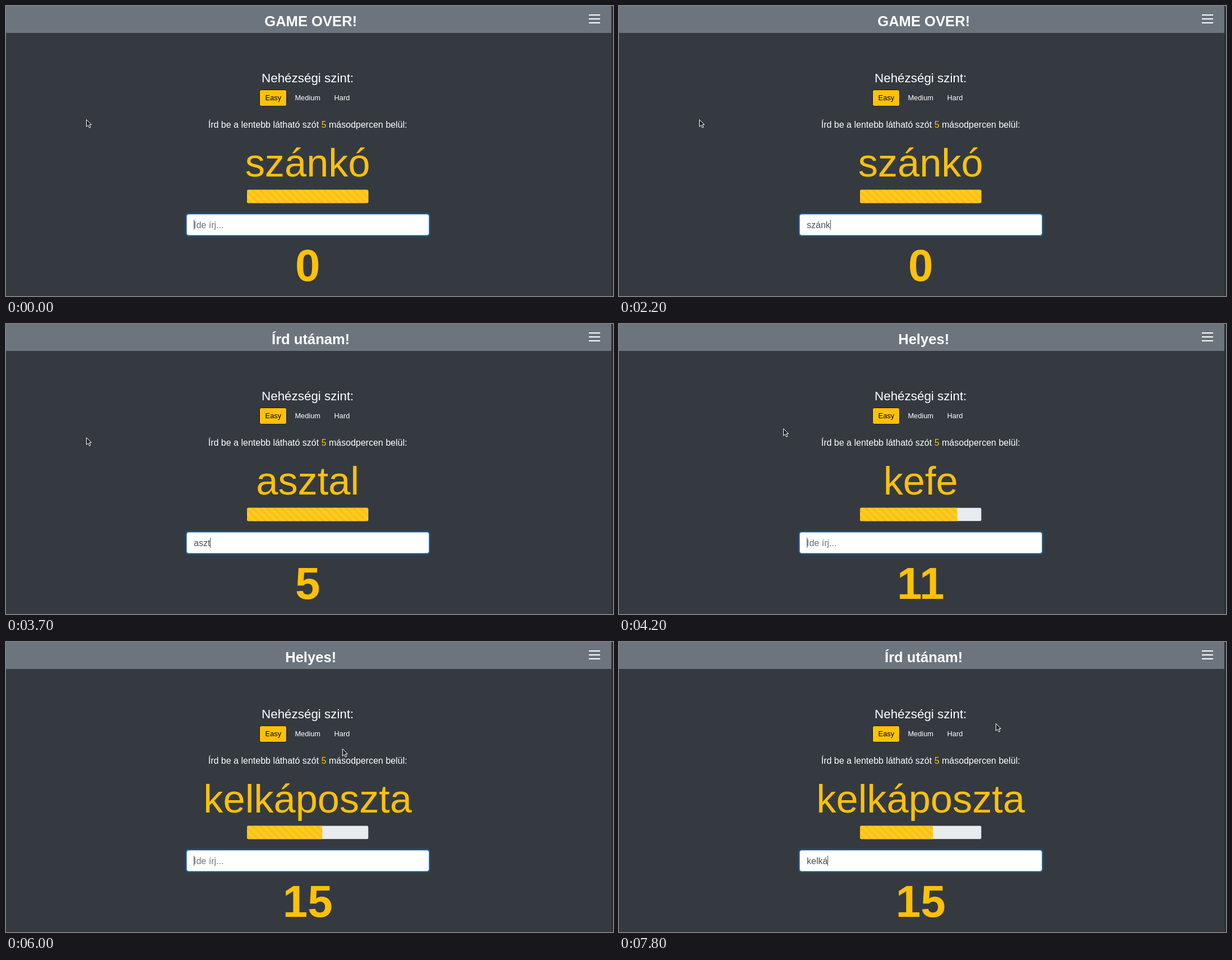
An HTML page that plays this animation: 1083 by 517 pixels, repeating every 8 s.

```html
<!DOCTYPE html>
<html lang="hu">
<head>
<meta charset="utf-8">
<title>Írd utánam!</title>
<style>
  html, body { margin: 0; width: 100%; height: 100%; overflow: hidden; background: #343a40; }
  svg { display: block; font-family: "Liberation Sans", Arial, sans-serif; fill: #fff; }
  .mid { text-anchor: middle; }
  .gold { fill: #ffc107; }
  .bold { font-weight: bold; }
  .fill { fill: #495057; }
  .hint { fill: #6c757d; }
</style>
</head>
<body>
<svg width="1083" height="517" viewBox="0 0 1083 517">
  <defs>
    <linearGradient id="shade" gradientUnits="userSpaceOnUse" x1="0" y1="12.8" x2="12.8" y2="0">
      <stop offset=".25" stop-color="#fff" stop-opacity=".15"/>
      <stop offset=".25" stop-color="#fff" stop-opacity="0"/>
      <stop offset=".5" stop-color="#fff" stop-opacity="0"/>
      <stop offset=".5" stop-color="#fff" stop-opacity=".15"/>
      <stop offset=".75" stop-color="#fff" stop-opacity=".15"/>
      <stop offset=".75" stop-color="#fff" stop-opacity="0"/>
    </linearGradient>
    <pattern id="stripes" patternUnits="userSpaceOnUse" x="430" y="327.5" width="12.8" height="12.8">
      <rect width="12.8" height="12.8" fill="url(#shade)"/>
    </pattern>
    <clipPath id="track"><rect x="430" y="327.5" width="216.6" height="24" rx="3.2"/></clipPath>
  </defs>

  <rect width="1083" height="517" fill="#343a40"/>
  <rect width="1080" height="48" fill="#6c757d"/>
  <rect x="1080" width="3" height="517" fill="#2a2e33"/>
  <path d="M1040 16h20M1040 23h20M1040 30h20" stroke="#fff" stroke-width="2"/>
  <text id="title" class="mid bold" x="543.7" y="36" font-size="25.6"></text>

  <text class="mid" x="538.2" y="136" font-size="22.4">Nehézségi szint:</text>
  <rect x="452.5" y="149.5" width="48" height="29" rx="3" fill="#ffc107" stroke="#16191c"/>
  <g font-size="12.8">
    <text x="462.6" y="168" fill="#000">Easy</text>
    <text x="515.4" y="168">Medium</text>
    <text x="585.6" y="168">Hard</text>
  </g>
  <text class="mid" x="538.2" y="217" font-size="16">Írd be a lentebb látható szót <tspan class="gold">5</tspan> másodpercen belül:</text>
  <text id="word" class="mid gold" x="538.2" y="304" font-size="70.4"></text>

  <g clip-path="url(#track)">
    <rect x="430" y="327.5" width="216.6" height="24" fill="#e9ecef"/>
    <rect class="gold bar" x="430" y="327.5" height="24"/>
    <rect class="bar" x="430" y="327.5" height="24" style="fill:url(#stripes)"/>
  </g>

  <rect x="319.4" y="368.4" width="438.2" height="43.2" rx="6" fill="#007bff" fill-opacity=".25"/>
  <rect x="322.5" y="371.5" width="432" height="37" rx="3.4" stroke="#80bdff"/>
  <text id="entry" x="335" y="396" font-size="16"></text>
  <rect id="caret" class="fill" y="381" width="1" height="18"/>
  <text id="score" class="mid gold bold" x="538.2" y="490" font-size="80"></text>
  <path id="pointer" d="M.5 .5V13.2L3.5 10.4 5.6 15.2 7.8 14.2 5.7 9.6H9.4Z" fill="#1c1e20" stroke="#fff"/>
</svg>
<script>
const LOOP = 8000, BAR = 216.6;
const el = id => document.getElementById(id);
const bars = document.querySelectorAll('.bar');
const ready = 'Írd utánam!', right = 'Helyes!';

// Each step lists only what changes at its time.
const steps = [
  [0, { title: 'GAME OVER!', word: 'szánkó', typed: 0, score: 0, left: 100, caret: true, pointer: [143, 202] }],
  [300, { caret: false }],
  [700, { typed: 1, caret: true }],
  [800, { typed: 2 }],
  [1300, { typed: 3 }],
  [1600, { typed: 4 }],
  [2200, { typed: 5 }],
  [2400, { title: right, word: 'asztal', typed: 0, score: 5 }],
  [3100, { title: ready, typed: 1 }],
  [3300, { typed: 2 }],
  [3500, { typed: 3 }],
  [3700, { typed: 4, left: 99.6 }],
  [4000, { typed: 5, left: 83.4 }],
  [4200, { title: right, word: 'kefe', typed: 0, score: 11, left: 80, pointer: [293, 186] }],
  [4800, { caret: false }],
  [5000, { title: ready, typed: 1, caret: true }],
  [5300, { typed: 2, left: 66 }],
  [5500, { typed: 3, left: 60.9 }],
  [5800, { left: 60 }],
  [6000, { title: right, word: 'kelkáposzta', typed: 0, score: 15, left: 62, pointer: [600, 190] }],
  [6300, { left: 77, pointer: [672, 145] }],
  [6500, { left: 80, caret: false }],
  [6800, { title: ready, typed: 2, caret: true }],
  [7000, { typed: 3 }],
  [7300, { typed: 4, left: 67.3 }],
  [7600, { left: 60.3 }],
  [7800, { typed: 5, left: 60 }]
];

let shown = -1;

function draw(now) {
  const time = now % LOOP;
  const current = steps.filter(([at]) => at <= time).length;
  if (current !== shown) {
    shown = current;
    render(Object.assign({}, ...steps.slice(0, current).map(step => step[1])));
  }
  requestAnimationFrame(draw);
}

function render(state) {
  for (const id of ['title', 'word', 'score']) el(id).textContent = state[id];
  const entry = el('entry');
  entry.textContent = state.word.slice(0, state.typed) || 'Ide írj...';
  entry.setAttribute('class', state.typed ? 'fill' : 'hint');
  const width = state.typed ? entry.getComputedTextLength() : 0;
  el('caret').setAttribute('x', Math.round(335 + width));
  el('caret').setAttribute('visibility', state.caret ? 'visible' : 'hidden');
  bars.forEach(bar => bar.setAttribute('width', BAR * state.left / 100));
  el('pointer').setAttribute('transform', `translate(${state.pointer})`);
}

draw(0);
</script>
</body>
</html>
```
